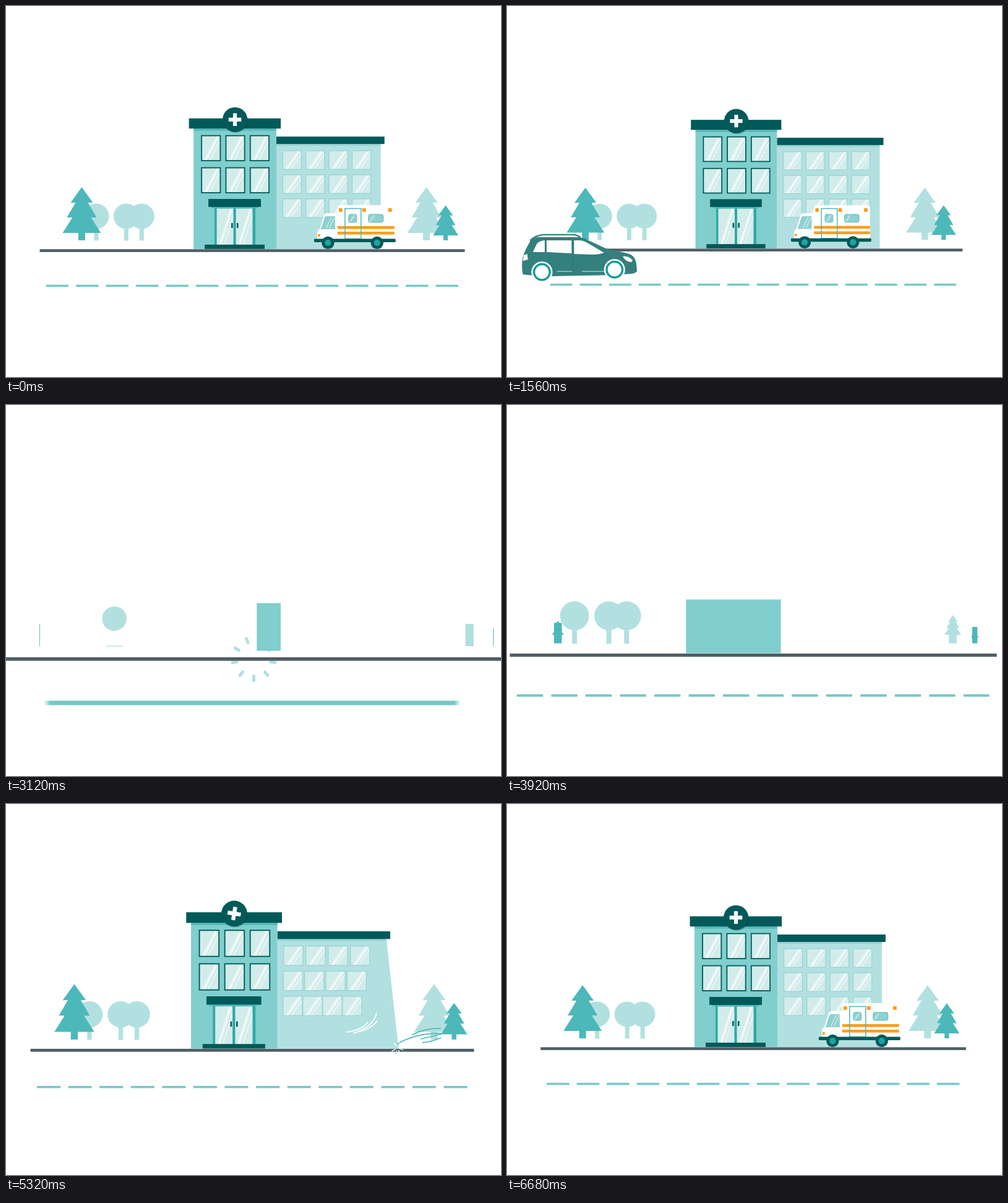
These frames come from a looping animation (800x600 px, 6.72 s). An HTML page with a canvas:

```html
<!DOCTYPE html>
<html lang="en">
<head>
<meta charset="utf-8">
<title>Hospital</title>
<style>
html, body { margin: 0; width: 100%; height: 100%; overflow: hidden; background: #fff }
canvas { display: block }
</style>
</head>
<body>
<canvas id="stage" width="800" height="600"></canvas>
<script>
const g = document.getElementById('stage').getContext('2d');
const LOOP = 6720, CUT = 2720, CX = 398, CY = 334;
const DARK = '#015a59', MAIN = '#80cecd', PALE = '#b2e0e0', PINE = '#4cb8b9',
  GLASS = '#d2ecea', ORANGE = '#ff9d1c', CAR = '#34807e', RING = '#1c9a95';
let T = 0;

// progress and easing
const p = (a, b, t = T) => Math.min(1, Math.max(0, (t - a) / (b - a)));
const mix = (a, b, u) => a + (b - a) * u;
const out2 = u => 1 - (1 - u) ** 2;
const out3 = u => 1 - (1 - u) ** 3;
const inOut = u => u < .5 ? 2 * u * u : 1 - 2 * (1 - u) ** 2;
const back = u => 1 + 3.2 * (u - 1) ** 3 + 2.2 * (u - 1) ** 2;

// drawing helpers
function rect(x, y, w, h, color) { g.fillStyle = color; g.fillRect(x, y, w, h); }
function round(x, y, w, h, r, color) {
  g.beginPath(); g.roundRect(x, y, w, h, r); g.fillStyle = color; g.fill();
}
function disc(x, y, r, color) {
  g.beginPath(); g.arc(x, y, Math.max(0, r), 0, 7); g.fillStyle = color; g.fill();
}
function fill(d, color) { g.fillStyle = color; g.fill(new Path2D(d)); }
function line(d, color, w) {
  g.strokeStyle = color; g.lineWidth = w; g.lineCap = 'round'; g.stroke(new Path2D(d));
}
function group(draw) { g.save(); draw(); g.restore(); }
function scaleAt(x, y, sx, sy = sx) { g.translate(x, y); g.scale(sx, sy); g.translate(-x, -y); }

function pane(x, y, w, h, edge, lw) {
  group(() => {
    g.beginPath(); g.rect(x, y, w, h); g.clip();
    rect(x, y, w, h, GLASS);
    g.lineCap = 'butt';
    g.strokeStyle = 'rgba(255,255,255,.65)';
    for (const [a, b] of [[.22, w * .14], [.45, w * .05]]) {
      g.lineWidth = b;
      g.beginPath();
      g.moveTo(x + w * (a - .05), y + h * 1.05);
      g.lineTo(x + w * (a + .7), y - h * .05);
      g.stroke();
    }
  });
  g.strokeStyle = edge; g.lineWidth = lw; g.strokeRect(x, y, w, h);
}

function road() {
  rect(54, 393.4, 688, 4.6, '#505e66');
  const grow = out3(p(2885, 3440)), split = inOut(p(3440, 4000)), h = mix(5.8, 3.4, split);
  if (!grow) return;
  const half = 334 * grow, y = 452.7 - h / 2, gap = 12 * split;
  if (grow < 1) {
    const fade = g.createLinearGradient(CX - half, 0, CX + half, 0);
    [[0, 0], [.016, 1], [.984, 1], [1, 0]].forEach(([o, a]) => fade.addColorStop(o, `rgba(116,201,198,${a})`));
    rect(CX - half, y, half * 2, h, fade);
  } else for (let i = 0; i < 14; i++) rect(64 + i * 48.54, y, 48.54 - (i < 13 ? gap : 12), h, '#74c9c6');
}

function pine(x, k, color, start) {
  const tw = 11 * k * out2(p(start, start + 120));
  if (!tw) return;
  const top = 379 - 29 * (k < 1 ? .8 : 1);
  rect(x - tw / 2, top, tw, 379 - top, color);
  const grow = inOut(p(start + 300, start + 1680));
  group(() => {
    g.translate(x, 367 + (k < 1 ? 4 : 0));
    g.scale(k * grow, k * grow);
    fill('M0-74L18-49H10L24-25H15L31 0H-31L-15-25H-24L-10-49H-18Z', color);
  });
}

function bush(x, start) {
  if (T < start) return;
  const e = out2(p(start + 120, start + 400)), w = mix(22, 7, e), h = mix(1, 40, e);
  rect(x - w / 2, 379.5 - h, w, h, PALE);
  disc(x, mix(346, 340, out2(p(start, start + 300))), 20.5 * back(p(start, start + 400)), PALE);
}

function block() {
  if (T >= 4120) return;
  const fall = p(2760, 2960), hop = p(2960, 3260), wide = inOut(p(3300, 3800));
  const right = mix(415.5 + 21.5 * out3(hop), 437, wide), w = mix(31, 134, wide), h = mix(62, 76, wide);
  const bottom = mix(230, 393, fall * fall) - 8 * Math.sin(Math.PI * hop);
  if (fall) rect(right - w, bottom - h, w, h, MAIN);
}

function burst() {
  const u = p(2960, 3260);
  if (u <= 0 || u >= 1) return;
  const r = 34 * out2(u) - 1.5, len = 2.8 * Math.min(1, 2 * (1 - u) + .1);
  for (let i = 0; i < 9; i++) group(() => {
    g.translate(400, 395.5);
    g.rotate((90 + i * 40) * Math.PI / 180);
    line(`M${r - len} 0H${r + len}`, PALE, 4);
  });
}

const roofAngle = t => Math.PI / 2 * (1 - p(4480, 4818, t)) ** 2;

function wing(h) {
  if (T < 4480) return;
  const angle = roofAngle(T), open = p(4640, 4840);
  const hy = 394 - 177 * h + 10 * (1 - open), reach = mix(153, 169, open);
  const tx = 437 + reach * Math.cos(angle), ty = hy + 6 + reach * Math.sin(angle);
  const drop = p(4640, 5240) ** 2;
  const bx = mix(tx, mix(625, 606, back(p(5340, 5700))), drop), by = mix(ty, 393, drop);
  group(() => {
    g.beginPath();
    g.moveTo(437, hy); g.lineTo(tx, ty); g.lineTo(bx, by);
    g.lineTo(437, mix(385, 393, drop));
    g.closePath();
    g.fillStyle = PALE; g.fill(); g.clip();
    if (!angle) rect(437, 223, 180, 3, '#98d4d3');
    for (let r = 0; r < 3; r++) {
      const f = out3(p(4860 + 55 * r, 5660 + 55 * r));
      if (f) for (let c = 0; c < 4; c++)
        pane(437 + (10.5 + 37.4 * c) * f, 234 + 39 * r, 30 * Math.min(1, f * 1.25), 30, '#98d3d3', 1.2);
    }
  });
  // the roof smears while it swings
  const copies = angle ? 9 : 1;
  for (let i = 0; i < copies; i++) group(() => {
    g.globalAlpha = angle ? .3 : 1;
    g.translate(437, hy);
    g.rotate(angle ? roofAngle(T + (i - 4) * 3.5) : 0);
    rect(0, -6, mix(173, 175, open), 12, DARK);
  });
}

function slam() {
  if (T < 5240 || T > 5440) return;
  group(() => {
    scaleAt(CX, CY, 1 / 1.0436);
    g.globalAlpha = 1 - p(5360, 5440);
    const e = p(5240, 5300);
    g.setLineDash([90 * e, 200]);
    line('M551 369Q577 365 585 353M562 371Q593 361 599 339M573 368Q592 362 600 351', '#fff', 1.8);
    line('M633 388Q664 370 704 371M657 373Q680 362 703 363M671 380Q688 376 704 372M674 386Q691 384 703 378', PINE, 1.6);
    g.setLineDash([]);
    for (let i = 0; i < 8; i++) group(() => {
      g.translate(633, 395); g.rotate(i * Math.PI / 4 + .3);
      line('M4 0H10', i % 2 ? '#fff' : PALE, 1.5);
    });
  });
}

function door() {
  const e = inOut(p(4160, 4460));
  if (!e) return;
  group(() => {
    scaleAt(370, 393, e, e * mix(.89, 1, inOut(p(4640, 4960))));
    rect(337, 325, 66, 63, '#2fa8a7');
    for (const x of [340, 371]) pane(x, 327, 28, 60, '#2fa8a7', 1);
    rect(364, 351, 2.5, 8, DARK);
    rect(373, 351, 2.5, 8, DARK);
    rect(327, 312, 85, 13, DARK);
    rect(332, 325, 75, 2, PINE);
  });
  const w = 97 * e;
  rect(369.5 - w / 2, 386, w, 7, DARK);
}

function facade(h) {
  if (T < 4120) return;
  group(() => {
    scaleAt(370, 394, 1, h);
    rect(303, 198, 134, 195, MAIN);
    const roof = out3(p(4160, 4440));
    rect(303, 198, 134 * roof, 3.5, '#58bab9');
    rect(369.8 - 74.3 * roof, 181.5, 148.6 * roof, 16.5, DARK);
    const lift = 1 - inOut(p(4640, 5000));
    for (let i = 0; i < 6; i++) {
      const c = i % 3, r = i / 3 | 0, k = out3(p(4240 + 30 * i, 4460 + 30 * i));
      if (k) group(() => {
        const x = 316 + 39.4 * c, y = 209.5 + 52 * r - lift * (r ? 5 * (c + 1) : 1.5 * c);
        scaleAt(x + 15, y + 20, k);
        pane(x, y, 30.3, 40.5, DARK, 1.8);
      });
    }
  });
  door();
  const pop = back(p(4320, 4900));
  if (T > 4320) group(() => {
    g.translate(370, 394 - 210.5 * h);
    g.scale(pop, pop);
    disc(1, 1.2, 20, 'rgba(0,50,50,.35)');
    disc(0, 0, 20, DARK);
    g.rotate((mix(-165, 0, out3(p(4320, 4640))) + 15 * (1 - inOut(p(4800, 6000)))) * Math.PI / 180);
    rect(-10.3, -3.1, 20.6, 6.2, '#fff');
    rect(-3.1, -10.3, 6.2, 20.6, '#fff');
  });
}

function ambulance() {
  if (T < 5640) return;
  const pop = back(p(5640, 5840));
  group(() => {
    g.translate(460 + 150 * (1 - inOut(p(5767, 7247))), 0);
    scaleAt(66, 393, pop);
    group(() => {
      g.translate(22, 382);
      g.rotate(-.021 * Math.sin(Math.PI * p(7050, 7990)) ** 2);
      g.translate(-22, -382);
      fill('M5 377V368Q5 362 9 361L16 338Q17 335 21 335H42V377Z', '#fff');
      round(38, 322, 92, 55, 4, '#fff');
      fill('M11 361L17 342Q18 340 20 340H34V361Z', '#8fd0d0');
      line('M20 359L28 342M25 359L33 342', 'rgba(255,255,255,.5)', 1.6);
      disc(8, 371, 2.2, ORANGE);
      rect(38, 356, 92, 4.6, ORANGE);
      rect(38, 365, 92, 4.6, ORANGE);
      for (const x of [40, 78, 120]) round(x, 327, 6, 6, 1, ORANGE);
      g.strokeStyle = PINE; g.lineWidth = 1.5; g.strokeRect(50, 327.5, 26, 49);
      for (const [x, w] of [[56, 13], [88, 24]]) {
        round(x, 337, w, 13, 3, '#8fd0d0');
        line(`M${x + 3} 348L${x + 9} 339`, 'rgba(255,255,255,.5)', 2);
        g.beginPath(); g.roundRect(x, 337, w, 13, 3);
        g.strokeStyle = '#5fbcbc'; g.lineWidth = 1; g.stroke();
      }
      round(0, 376.5, 132, 5.5, 1.5, DARK);
    });
    for (const x of [22.5, 102]) { disc(x, 383, 10.2, DARK); disc(x, 383, 5.2, '#1fa3a0'); }
  });
}

function streaks() {
  const head = p(7400, 7520), tail = p(7560, 7840);
  if (!head || tail === 1) return;
  const draw = (d, len) => {
    g.setLineDash([len * (head - tail), 999]);
    g.lineDashOffset = -len * tail;
    line(d, '#bfe1e4', 1.4);
  };
  draw('M250 419C190 413 105 405 72 429', 186);
  draw('M343 437Q300 441 256 438', 90);
  draw('M400 420Q368 419 349 409', 56);
  g.setLineDash([]);
}

function wheel(x, y, start) {
  const k = back(p(start, start + 340));
  if (T <= start) return;
  disc(x, y, 17 * k, '#fff');
  disc(x, y, 14.5 * k, RING);
  disc(x, y, 11 * k, '#fff');
}

function car() {
  if (T < 7400) return;
  group(() => {
    scaleAt(CX, CY, 1 / .98);
    streaks();
    g.translate(900 * p(9080, 9420) ** 2, 0);
    const body = back(p(7900, 8300));
    if (T > 7900) group(() => {
      scaleAt(57, 434, body);
      line('M39 379Q47 371 60 370H106Q114 370 119 374', CAR, 2.2);
      fill('M27 434Q24 420 27 405Q31 393 39 380Q43 374 52 374H112Q122 374 132 379L164 394Q190 398 200 402Q208 407 209 417L210 428Q209 432 200 433L160 435L60 437Z', CAR);
      fill('M43 398L49 385Q52 380 62 379V398Z M65 379H105V400L65 398Z M109 379H117Q124 379 132 384L157 399Q150 402 138 402L109 401Z', '#fff');
      fill('M28 403L34 401L35 410L27 412Z M187 405Q196 403 203 411L201 414Q192 414 187 405Z', '#fff');
      line('M82 429H106M122 429H158', '#8fcac9', 1.3);
      line('M107 402V430', '#2b706f', .8);
      const k = back(p(8300, 8600));
      if (T > 8300) group(() => {
        scaleAt(124, 400, k);
        fill('M116 401Q117 393 124 393Q131 394 132 401Z', '#f4e5d5');
        disc(122, 387, 5.4, '#4a2c1c');
        disc(124.5, 388.5, 3.8, '#f0a04c');
        line('M129 397L137 395M137 393L142 389', '#e98b3a', 1.8);
      });
    });
    wheel(57.5, 430, 7500);
    wheel(174.5, 426, 7700);
  });
}

function frame(now) {
  const t = now % LOOP;
  T = t < CUT ? t + LOOP : t;
  g.setTransform(1, 0, 0, 1, 0, 0);
  rect(0, 0, 800, 600, '#fff');
  const zoom = .98 + (.767 - 8.8e-5 * (Math.min(T, 9080) - 3120)) ** 5 + .75 * p(9080, 9440) ** 2;
  scaleAt(CX, CY, zoom);

  const h = mix(.39, 1, inOut(p(4120, 4780)));
  bush(145.5, 3240);
  bush(194, 3180);
  bush(219, 3040);
  pine(680, 1, PALE, 3020);
  pine(122, 1, PINE, 3117);
  pine(711, .66, PINE, 3114);
  wing(h);
  burst();
  block();
  facade(h);
  road();
  slam();
  ambulance();
  car();
  requestAnimationFrame(frame);
}
requestAnimationFrame(() => frame(0));
</script>
</body>
</html>
```
